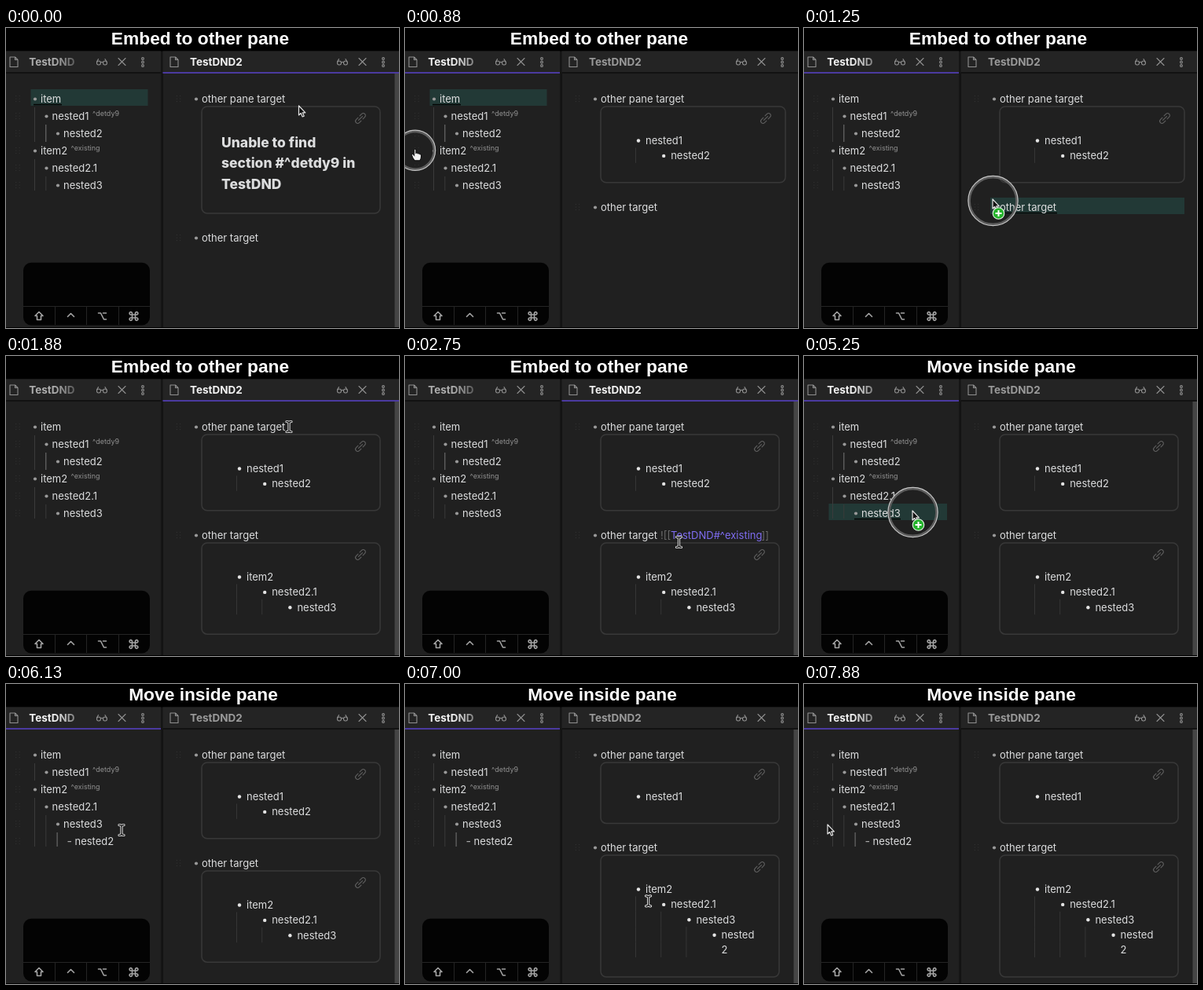
An HTML page for the animation above (8000 ms loop, 500 by 382 pixels).

```html
<!DOCTYPE html>
<html lang="en">
<head>
<meta charset="utf-8">
<title>List drag and drop</title>
<style>
  html, body { margin: 0; width: 100%; height: 100%; overflow: hidden; background: #000; }
  svg { display: block; width: 100vw; height: 100vh; }
  text { font: 13px Inter, sans-serif; fill: #dcddde; white-space: pre; }
  .title { font: bold 22.75px "Liberation Sans", Arial, sans-serif; fill: #fff; text-anchor: middle; }
  .tab { font-size: 13.5px; font-weight: 700; }
  .error { font-size: 17.5px; font-weight: 800; }
  .ref { font-size: 9px; fill: #919191; }
  .dim { fill: #6a6a6a; }
  .link { fill: #7f6df2; }
  .icon { fill: none; stroke: #8f8f8f; stroke-width: 1.1; stroke-linejoin: round; stroke-linecap: round; }
</style>
</head>
<body>
<svg viewBox="0 0 500 382" preserveAspectRatio="none">
  <defs>
    <linearGradient id="fadeOn" gradientUnits="userSpaceOnUse" x1="62" x2="94" y1="0" y2="0">
      <stop stop-color="#f2f2f2"/><stop offset="1" stop-color="#666"/>
    </linearGradient>
    <linearGradient id="fadeOff" gradientUnits="userSpaceOnUse" x1="62" x2="94" y1="0" y2="0">
      <stop stop-color="#adadad"/><stop offset="1" stop-color="#484848"/>
    </linearGradient>
    <g id="tools" class="icon">
      <path d="M-58.500 43-56.500 39.500M-46 43-48 39.500M-53.500 44q1.500-1.500 3 0"/>
      <circle cx="-56" cy="44.500" r="2.500"/><circle cx="-48" cy="44.500" r="2.500"/>
      <path d="M-31 38.500l9 9m0-9l-9 9"/>
      <circle cy="39" r="1.400"/><circle cy="43.500" r="1.400"/><circle cy="48" r="1.400"/>
    </g>
    <path id="file" class="icon" d="M-5 37H1.500L5 40.500V49.500H-5ZM1.500 37V40.500H5"/>
    <g id="chain" class="icon">
      <path transform="rotate(-45)" d="M-1.500-2.800H-5a2.800 2.800 0 0 0 0 5.600H-1.500M1.500-2.800H5a2.800 2.800 0 0 1 0 5.600H1.500M-3.500 0H3.500" stroke="#606060"/>
    </g>
    <path id="arrow" d="M0 0V12L2.700 9.500 4.700 14 6.700 13.100 4.800 8.800H8.400Z" fill="#111" stroke="#e4e4e4" stroke-width="1.200" stroke-linejoin="round"/>
    <path id="beamLine" d="M-3-6.500Q0-6.500 0-4.500Q0-6.500 3-6.500M0-4.500V4.500M-3 6.500Q0 6.500 0 4.500Q0 6.500 3 6.500" fill="none" stroke-linecap="round"/>
    <g id="beam">
      <use href="#beamLine" stroke="#eee" stroke-width="3.200"/>
      <use href="#beamLine" stroke="#111" stroke-width="1.300"/>
    </g>
    <path id="hand" transform="scale(1.120)" d="M-2 7Q-5 3-5.500 0Q-4.500-1.500-2.500 1V-5.500Q-1.500-7-.5-5.500V-1.500Q1-2.500 1.800-1Q3.500-1.500 4-.2Q5.500-.3 5.500 1.500Q5.500 5 4 7Z" fill="#f4f4f4" stroke="#111"/>
    <g id="plus">
      <circle r="7.300" fill="#24b32b" stroke="#e6f5e6" stroke-width="1.100"/>
      <path d="M-4 0H4M0-4V4" stroke="#fff" stroke-width="2"/>
    </g>
  </defs>

  <rect width="500" height="382"/>
  <rect y="29.500" width="197" height="351.500" fill="#202020"/>
  <rect x="199.500" y="29.500" width="300.500" height="351.500" fill="#202020"/>
  <rect x="197" y="29.500" width="2.500" height="351.500" fill="#151515"/>

  <g id="scene"></g>

  <rect x="22" y="298.700" width="161" height="79.800" rx="10" fill="#030303"/>
  <path d="M22 354.500H183M62.500 355V378M102.500 355V378M143.500 355V378" stroke="#242424"/>
  <g class="icon" style="stroke:#a5a5a5;stroke-width:1.600">
    <path d="M42 361.500L47 366.500H44.500V371.500H39.500V366.500H37Z"/>
    <path d="M78.500 367.500L82.500 363.500 86.500 367.500"/>
    <path d="M117.500 363H120.500L124.500 371H127.500M123.500 363H127.500"/>
    <path d="M160.500 365V369H164.500V365ZM160.500 365H159a1.700 1.700 0 1 1 1.500-1.700ZM164.500 365V363.300a1.700 1.700 0 1 1 1.500 1.700ZM164.500 369H166a1.700 1.700 0 1 1-1.500 1.700ZM160.500 369V370.700a1.700 1.700 0 1 1-1.500-1.700Z"/>
  </g>
  <g id="pointer"></g>
</svg>
<script>
const LOOP = 8000, STEP = 125, ROW = 22, EMBED_ROW = 19.4;
const scene = document.getElementById('scene');
const pointer = document.getElementById('pointer');

// time, x, y, shape
const path = [
  [0, 372.5, 99, 'arrow'], [125, 372.5, 99, 'arrow'], [375, 250, 130, 'arrow'], [750, 14, 158, 'hand'],
  [875, 14.5, 161, 'hand'], [1000, 30, 162, 'arrow'], [1250, 240, 218, 'arrow'], [1500, 318, 227, 'arrow'],
  [1625, 330, 190, 'beam'], [1875, 360, 90, 'beam'], [2250, 360, 91, 'beam'], [2625, 352, 245, 'beam'],
  [2875, 345, 229, 'beam'], [3000, 362, 262, 'arrow'], [3375, 364, 265, 'arrow'], [4125, 364, 265, 'arrow'],
  [4625, 140, 190, 'arrow'], [4875, 14, 141, 'hand'], [5000, 14, 141, 'hand'], [5125, 40, 152, 'arrow'],
  [5250, 138, 197, 'arrow'], [5375, 140, 197, 'arrow'], [5500, 146, 190, 'beam'], [5625, 147, 186, 'beam'],
  [6125, 147, 186, 'beam'], [6375, 80, 186, 'beam'], [6625, 57, 186, 'beam'], [6750, 57, 186, 'beam'],
  [7125, 398, 308, 'arrow'], [7250, 398, 308, 'arrow'], [7625, 116, 172, 'beam'], [7750, 70, 176, 'arrow'],
  [7875, 30, 179, 'arrow'], [8000, 30, 179, 'arrow']
];

const during = (t, from, to) => t >= from && t < to;
const overflows = t => !during(t, 250, 1500);
const text = (x, mid, value, cls = '', attrs = '') =>
  `<text x="${x}" y="${mid + 4.7}" class="${cls}" ${attrs}>${value}</text>`;
const dot = (x, y, r, fill) => `<circle cx="${x}" cy="${y}" r="${r}" fill="${fill}"/>`;
const line = (x, y1, y2, color) => `<path d="M${x} ${y1}V${y2}" stroke="${color}"/>`;
const use = (id, x, y = 0) => `<use href="#${id}" x="${x}" y="${y}"/>`;
const rect = (x, y, w, h, fill) => `<rect x="${x}" y="${y}" width="${w}" height="${h}" fill="${fill}"/>`;

function handle(x, y) {
  return [-3.5, 0, 3.5].map(dy => dot(x - 2.2, y + dy, .6, '#363636') + dot(x + 2.2, y + dy, .6, '#363636')).join('');
}

function highlight(x, right, mid, lineX, lineEnd) {
  return rect(x, mid - 12, right - x, 21, '#223936') + rect(lineX, mid + 6.8, lineEnd - lineX, 1.6, '#050505');
}

function header(x, end, label, active, fill) {
  return rect(x, 29.5, end - x, 28, '#242424') +
    rect(x, 56, end - x, 2, active ? '#4b3aa0' : '#121212') +
    use('file', x + (x ? 14.5 : 10)) +
    text(x ? 234 : 29.2, 43, label, 'tab', `style="fill:${fill}"`) +
    use('tools', x ? 480 : 174);
}

function outline(moved) {
  const items = [['item', 0], ['nested1', 1, '^detdy9', 110], ['item2', 0, '^existing', 82.5], ['nested2.1', 1], ['nested3', 2]];
  items.splice(moved ? 5 : 2, 0, ['nested2', moved ? 3 : 2]);
  return items.map(([label, depth, ref, refX], i) => {
    const y = 90 + i * ROW, x = 37 + depth * 14.5;
    const bottom = i === items.length - 1 ? 7 : 11;
    let out = handle(15, y);
    for (let d = 0; d < depth; d++) {
      const lit = label === 'nested2' && d === depth - 1;
      out += line(36.5 + d * 14.3, y - 11, y + bottom, lit ? '#777' : '#3b3b3b');
    }
    out += depth === 3 ? rect(78.5, y, 4.5, 1.2, '#aaa') : dot(x, y + .5, 2.1, '#999');
    return out + text(x + 7, y, label) + (ref ? text(refX, y - 4.3, ref, 'ref') : '');
  }).join('');
}

function embed(top, height, right, body) {
  return `<rect x="249" y="${top}" width="${right - 249}" height="${height}" rx="7" fill="none" stroke="#383838" stroke-width="1.5"/>` +
    use('chain', right - 25, top + 15) + body;
}

function embedList(top, right, rows) {
  const body = rows.map(([label, depth], i) => {
    const y = top + 43 + i * EMBED_ROW, x = 297 + depth * 32.2;
    let out = '';
    for (let d = 0; d < depth; d++) out += line(293.5 + d * 32.2, y - 10, y + 9.4, '#363636');
    return out + (label === '2' ? '' : dot(x, y + .5, 2.2, '#e4e4e4')) + text(x + 9, y, label);
  }).join('');
  return embed(top, 58 + rows.length * EMBED_ROW, right, body);
}

function errorBox(top, right) {
  return embed(top, 136, right, ['Unable to find', 'section #^detdy9 in', 'TestDND']
    .map((s, i) => text(274, top + 47.3 + i * 26.3, s, 'error')).join(''));
}

function linkText(x, y, target, end) {
  return text(x, y, '![[', 'dim') + text(x + 13, y, `TestDND#${target}`, 'link') + text(end, y, ']]', 'dim');
}

function rightPane(t) {
  const broken = t < 250, updated = t >= 6500;
  const wrapped = during(t, 2125, 2750);
  const top = wrapped ? 119 : 100;
  const right = overflows(t) ? 476 : 484;
  const rows = [['nested1', 0]];
  if (!updated) rows.push(['nested2', 1]);
  const height = broken ? 136 : 58 + rows.length * EMBED_ROW;
  const second = Math.round(top + height + 31);

  let out = overflows(t) ? rect(494.5, 58, 5.5, 323, '#454545') : '';
  out += handle(219.5, 90) + dot(242, 90.5, 2.1, '#999') + text(249, 90, 'other pane target');
  if (wrapped) out += linkText(249, 109, '^detdy9', 359) + (t < 2500 ? line(358.5, 83, 98, '#ddd') : '');
  out += broken ? errorBox(top, right) : embedList(top, right, rows);

  if (during(t, 1250, 1500)) out += highlight(237, right, second, 240, 322);
  out += handle(219.5, second) + dot(242, second + .5, 2.1, '#999') + text(249, second, 'other target');
  if (during(t, 2750, 5125)) {
    out += linkText(325, second, '^existing', 453.5);
    if (during(t, 3375, 3625) || during(t, 4000, 4375) || during(t, 4625, 5000)) out += line(324.8, second - 8, second + 8, '#eee');
  }
  if (t >= 1500) {
    const copy = [['item2', 0], ['nested2.1', 1], ['nested3', 2]];
    if (updated) copy.push(['nested', 3], ['2', 3]);
    out += embedList(second + 10, right, copy);
  }
  return out;
}

function drawScene(t) {
  const late = t >= 5125;
  const leftActive = during(t, 875, 1500) || late;
  let out = `<text class="title" x="${late ? 251 : 247}" y="21">${late ? 'Move inside pane' : 'Embed to other pane'}</text>`;
  out += header(0, 197, 'TestDND', leftActive, leftActive ? 'url(#fadeOn)' : 'url(#fadeOff)');
  out += header(199.5, 500, 'TestDND2', !leftActive, leftActive ? '#9a9a9a' : '#f2f2f2');
  if (t < 1000) out += highlight(31.5, 180.5, 90, 35, 71);
  if (during(t, 5250, 5375)) out += highlight(31.5, 182, 200, 64, 123);
  return out + outline(t >= 5375) + rightPane(t);
}

function drawPointer(t) {
  const i = path.findIndex((p, n) => n + 1 === path.length || t < path[n + 1][0]);
  const a = path[i], b = path[i + 1] || a;
  const f = b === a ? 0 : (t - a[0]) / (b[0] - a[0]);
  const ease = f * f * (3 - 2 * f);
  const x = a[1] + (b[1] - a[1]) * ease, y = a[2] + (b[2] - a[2]) * ease;
  const dragging = during(t, 1000, 1500) || during(t, 5250, 5375);
  const pressed = dragging || during(t, 875, 1000) || during(t, 5125, 5250);
  let out = '';
  if (pressed) {
    const [cx, cy, r] = dragging ? [x + .5, y + 2, 31] : [x - 1.5, y - 5.2, 25];
    const circle = (radius, color, w) =>
      `<circle cx="${cx}" cy="${cy}" r="${radius}" fill="none" stroke="${color}" stroke-width="${w}"/>`;
    out += circle(r - .8, '#5c5c5c', 3.2) + circle(r + .6, '#c4c4c4', 1.2);
  }
  out += use(a[3], x, y);
  return out + (dragging ? use('plus', x + 7.5, y + 18) : '');
}

let shown = -1;
function tick(now) {
  const t = Math.floor(now % LOOP / STEP) * STEP;
  if (t !== shown) {
    shown = t;
    scene.innerHTML = drawScene(t);
    pointer.innerHTML = drawPointer(t);
  }
  requestAnimationFrame(tick);
}
tick(0);
</script>
</body>
</html>
```
